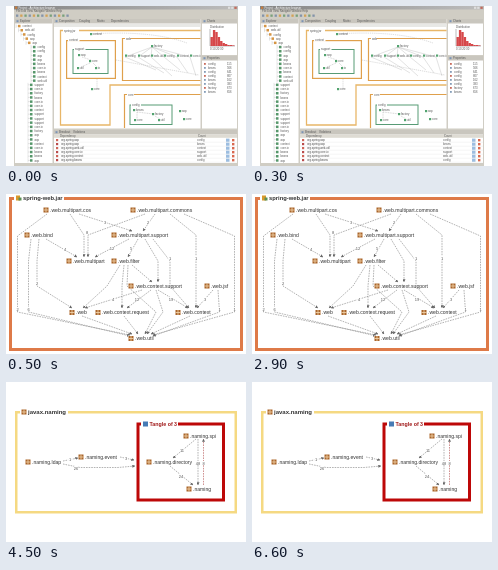
Animation, 240 px wide and 160 px high, one loop 8000 ms. Source, as an HTML page:

```html
<!DOCTYPE html>
<html lang="en">
<head>
<meta charset="utf-8">
<title>Package dependency views</title>
<style>
  html, body { margin: 0; width: 100%; height: 100%; overflow: hidden; background: #fff; }
  svg { display: block; width: 100vw; height: 100vh; }
  text { font-family: "Liberation Sans", Arial, sans-serif; }
</style>
</head>
<body>
<svg id="stage" viewBox="0 0 240 160">
  <defs>
    <marker id="arrow" viewBox="0 0 4 4" refX="3.6" refY="2" markerWidth="3" markerHeight="3"
            markerUnits="userSpaceOnUse" orient="auto"><path d="M0 0L4 2L0 4z" fill="#666"/></marker>
    <linearGradient id="titleBar"><stop stop-color="#848484"/><stop offset="1" stop-color="#bdbdbd"/></linearGradient>
    <clipPath id="canvas"><path d="M48 18H194.5V122H48z"/></clipPath>
  </defs>
</svg>
<script>
const LOOP = 8000;
const stage = document.getElementById('stage');

const rect = (x, y, w, h, fill) => `<rect x="${x}" y="${y}" width="${w}" height="${h}" fill="${fill}"/>`;
const box = (x, y, w, h, color, line, fill = '#fff') =>
  `<rect x="${x + line / 2}" y="${y + line / 2}" width="${w - line}" height="${h - line}" ` +
  `fill="${fill}" stroke="${color}" stroke-width="${line}"/>`;
const label = (x, y, text, size = 5.1, color = '#333', extra = '') =>
  `<text x="${x}" y="${y}" font-size="${size}" fill="${color}" ${extra}>${text}</text>`;
const title = (x, y, text, size, color = '#333') => label(x, y, text, size, color, 'font-weight="bold"');
const line = (d, color, width = .5, extra = '') =>
  `<path d="${d}" fill="none" stroke="${color}" stroke-width="${width}" ${extra}/>`;

// Brown package icon centred on (x, y), followed by its name.
const icon = (x, y) => rect(x - 2.5, y - 2.5, 5, 5, '#a9652b') +
  line(`M${x - 2.5} ${y}h5M${x} ${y - 2.5}v5`, '#f5d9b0', .8);
const node = (x, y, name) => rect(x - 3, y - 3, 7, 6, '#fff') + icon(x, y) + label(x + 4, y + 1.8, name);

const edge = (d, color = '#808080') =>
  line('M' + d, color, .6, 'stroke-dasharray="1.6 1" marker-end="url(#arrow)"');
const count = (x, y, n) => rect(x - 1.8, y - 2, 3.6, 4, '#fff') +
  label(x, y + 1.5, n, 4, '#555', 'text-anchor="middle"');

function seeded(seed) {
  return () => (seed = (seed * 16807) % 2147483647) / 2147483647;
}

function workbench() {
  const random = seeded(41);
  const words = ['context', 'support', 'beans', 'web.util', 'factory', 'core.io', 'aop', 'config'];
  const word = () => words[Math.floor(random() * words.length)];
  const tiny = (x, y, text, color = '#555') => label(x, y, text, 2.8, color);
  const header = (x, y, w, name) => rect(x, y, w, 4.5, '#c9c6be') + rect(x + 1.5, y + 1.2, 2, 2, '#7c93b5') +
    tiny(x + 5, y + 3.3, name);
  let s = rect(8, 0, 224, 160, '#d0cdc4') + rect(8, 0, 224, 3.5, 'url(#titleBar)') +
    rect(9, .6, 2.2, 2.2, '#c77b3c') + tiny(12.5, 2.7, 'Project - Architecture browser', '#fff');
  for (let i = 0; i < 3; i++) s += rect(222 + i * 3.2, .7, 2.3, 2.2, i < 2 ? '#dedede' : '#c46a5c');
  s += tiny(10, 6.4, 'File  Edit  View  Navigate  Window  Help');
  for (let i = 0; i < 13; i++)
    s += rect(10 + i * 4.2, 8.5, 2.3, 2.3, ['#8393aa', '#d3a256', '#79a17a'][i % 3]);

  // Package tree
  s += rect(9, 13, 37.5, 144, '#fff') + header(9, 13, 37.5, 'Explorer');
  for (let i = 0; i < 33; i++) {
    const y = 20 + i * 4.2, x = i < 5 ? 12 + i * 2.5 : i < 14 ? 27 : 24;
    s += line(`M${x - 2} ${y - 2}v4M${x - 2} ${y}h2`, '#aaa', .3) +
      rect(x, y - 1.2, 2.5, 2.5, i < 5 ? '#d69543' : '#56976b') + tiny(x + 4.5, y + 1.1, word());
  }

  // Composition diagram
  const green = (x, y, name) => rect(x, y, 2.2, 2.2, '#52a36f') + tiny(x + 3, y + 2, name);
  const tab = (x, y, name) => rect(x - 1, y - 2.5, name.length * 1.5 + 1, 3, '#fff') + tiny(x, y, name);
  let diagram = line('M198 24.5H54.5V119H104V79H198', '#e8b668', 1.3) +
    box(60, 34, 50, 39, '#dfa04c', 1.2) + box(66.5, 43, 36, 25, '#579b75', 1) +
    line('M198 32.5H116.5V74.5H198', '#dfa04c', 1.2) +
    line('M198 88.5H118.5V125', '#dfa04c', 1.2) + box(123.5, 98.5, 43, 20.5, '#579b75', 1) +
    tab(58, 25.5, 'spring.jar') + tab(63, 35.2, 'context') + tab(69, 44, 'support') +
    tab(120, 33.5, 'web') + tab(122, 89.5, 'core') + tab(126, 99.5, 'config') +
    line('M76 51L85 54M84 57L75 61M87 57L91 61M131 106L147 108M149 110L154 113M131 106V113',
      '#999', .4, 'stroke-dasharray="1 .7"');
  for (let i = 0; i < 6; i++) {
    const x = 119 + i * 13;
    diagram += line(`M${x} 51L${150 + i * 8} ${64 + i % 3 * 3}M${x} 51L146 41`, '#b5b5b5', .4) +
      green(x, 48.5, word());
  }
  diagram += line('M110 54L193 69M84 28Q145 24 181 37M91 73V83', '#aaa', .4, 'stroke-dasharray="1.3 .8"') +
    green(84, 27, 'context') + green(145, 39, 'factory') + green(85, 82, 'core') +
    green(72, 48, 'aop') + green(83, 54, 'core') + green(71, 61, 'util') + green(89, 61, 'io') +
    green(127, 103, 'beans') + green(146, 107, 'factory') + green(128, 113, 'core') + green(152, 113, 'util') +
    green(173, 104, 'aop') + green(177, 112, 'core');
  s += rect(48, 13, 146.5, 109.5, '#fff') + header(48, 13, 146.5, 'Composition') +
    tiny(73, 16.3, 'Coupling') + tiny(91, 16.3, 'Matrix') + tiny(105, 16.3, 'Dependencies') +
    rect(48, 18, 146.5, 3, '#e8e8e5') + `<g clip-path="url(#canvas)">${diagram}</g>`;

  // Distribution chart and metrics
  s += rect(196, 13, 35, 36, '#fff') + header(196, 13, 35, 'Charts') + tiny(204, 21.5, 'Distribution') +
    line('M204 23V40H229', '#777', .5);
  [9, 16, 14, 9, 5, 3, 2, 1, 1, .6].forEach((h, i) => s += rect(204.5 + i * 2.4, 40 - h, 2.4, h, '#d6484a'));
  s += tiny(204, 44, '0  10  20  30') + rect(196, 50, 35, 72.5, '#fff') + header(196, 50, 35, 'Properties');
  for (let i = 0; i < 8; i++)
    s += rect(198, 57 + i * 4, 1.8, 1.8, i % 3 ? '#849db8' : '#c86a5b') + tiny(202, 59 + i * 4, word()) +
      tiny(221, 59 + i * 4, Math.floor(random() * 900));

  // Dependency list
  s += rect(48, 124, 183, 33, '#fff') + header(48, 124, 183, 'Breakout') + tiny(67, 127.3, 'Violations') +
    rect(48, 128.5, 183, 3.3, '#dedbd3') + tiny(54, 131, 'Dependency') + tiny(192, 131, 'Count');
  for (let i = 0; i < 6; i++) {
    const y = 133 + i * 4;
    s += rect(50, y, 2.2, 2.2, i % 2 ? '#b94b4b' : '#cf6559') + tiny(55, y + 2.2, 'org.spring.' + word(), '#444') +
      tiny(191, y + 2.2, word()) + rect(220, y - .4, 3.5, 3.2, '#9cbde0') + rect(226, y, 2.4, 2.4, '#d9694f') +
      line(`M48 ${y + 3.2}h183`, '#ddd', .3);
  }
  return s;
}

function jarGraph() {
  // Long edges bend only where they cross a layer of packages.
  const edges = [
    '41 20L11.5 42V118L124 141', '64 20L78 41V63', '73 20L126 37',
    '149 20L137 37', '139 20L82 41V63', '164 20L190 41V114', '178 20L228.5 42V118L147 141',
    '25 45L22.5 67V118L124 142', '33 45L31 67V92L66 114', '40 45L71 63',
    '123 45L89 63', '132 45L122 63', '139 45L152 67V88', '147 45L164 67V92L183 114',
    '126 71L146 88', '114 71L101 92L77 114', '118 71L116 92V114', '122 71L121 92L150 118L139 140',
    '136 96L79 114', '145 96L121 114', '152 96L182 114', '150 96L157 118L141 140',
    '207 96L191 114', '212 96L213.5 118L147 142',
    '76 122L126 140', '118 122L132 140', '184 122L145 140'
  ];
  const counts = [[81, 38, 8], [99, 28.5, 3], [59, 55, 4], [106, 54, 12], [125, 54, 5], [142, 28, 2],
    [190, 64, 1], [31, 89, 2], [11.5, 115, 2], [22.5, 115, 6], [107, 105, 4], [131, 105, 12],
    [165, 105, 19], [164, 64, 1], [199, 105, 3], [213.5, 115, 1], [228.5, 115, 1]];
  const nodes = [[40, 16, 'multipart.cos'], [127, 16, 'multipart.commons'], [21, 41, 'bind'],
    [108, 41, 'multipart.support'], [63, 67, 'multipart'], [108, 67, 'filter'], [125, 92, 'context.support'],
    [201, 92, 'jsf'], [66, 118.5, ''], [92, 118.5, 'context.request'], [172, 118.5, 'context'], [125, 144.5, 'util']];
  return box(3, 3, 234, 154, '#de7a48', 3) + rect(8, 0, 50, 8, '#fff') +
    rect(10, 1.5, 4, 5, '#d89a2c') + rect(12.5, 3.5, 3, 3, '#5c8f55') +
    title(17, 6, 'spring-web.jar', 5.8) +
    edges.map(d => edge(d)).join('') + counts.map(c => count(...c)).join('') +
    nodes.map(([x, y, name]) => node(x, y, '.web' + (name && '.' + name))).join('');
}

function tangleGraph() {
  const edges = ['57 79L72 76', '57 82L74 85.5H112L129 84', '114 75L128 78',
    '190 57L167 76', '164 84L187 103', '192 57V103'];
  const counts = [[64, 77.5, 1], [70, 86, 26], [120, 76.5, 3], [176, 68, 11], [175, 94, 24],
    [192, 81, 48], [197.5, 81, 8]];
  const nodes = [[22, 80, '.ldap'], [75, 75, '.event'], [143, 80, '.directory'],
    [180, 54, '.spi'], [183, 107, '']];
  return box(9, 29, 222, 102.5, '#f5d982', 2.5) + rect(14, 26, 48, 8, '#fff') + icon(18, 30) +
    title(22, 32, 'javax.naming', 6) +
    box(130.5, 40.5, 88.5, 79, '#bd0808', 3) + rect(135, 38, 37, 8, '#fff') +
    rect(137, 39.5, 5, 5, '#477bb5') +
    title(143.5, 44, 'Tangle of 3', 5.3, '#a01818') +
    edges.map(d => edge(d)).join('') + edge('197.5 103V57', '#b04848') + counts.map(c => count(...c)).join('') +
    nodes.map(([x, y, name]) => node(x, y, '.naming' + name)).join('');
}

const scenes = [workbench, jarGraph, tangleGraph].map(draw => {
  const group = document.createElementNS('http://www.w3.org/2000/svg', 'g');
  group.innerHTML = draw();
  return stage.appendChild(group);
});

const start = performance.now();
function show() {
  const time = (performance.now() - start) % LOOP;
  const current = time < 500 ? 0 : time < 4500 ? 1 : 2;
  scenes.forEach((scene, i) => { scene.style.display = i === current ? '' : 'none'; });
  requestAnimationFrame(show);
}
show();
</script>
</body>
</html>
```
